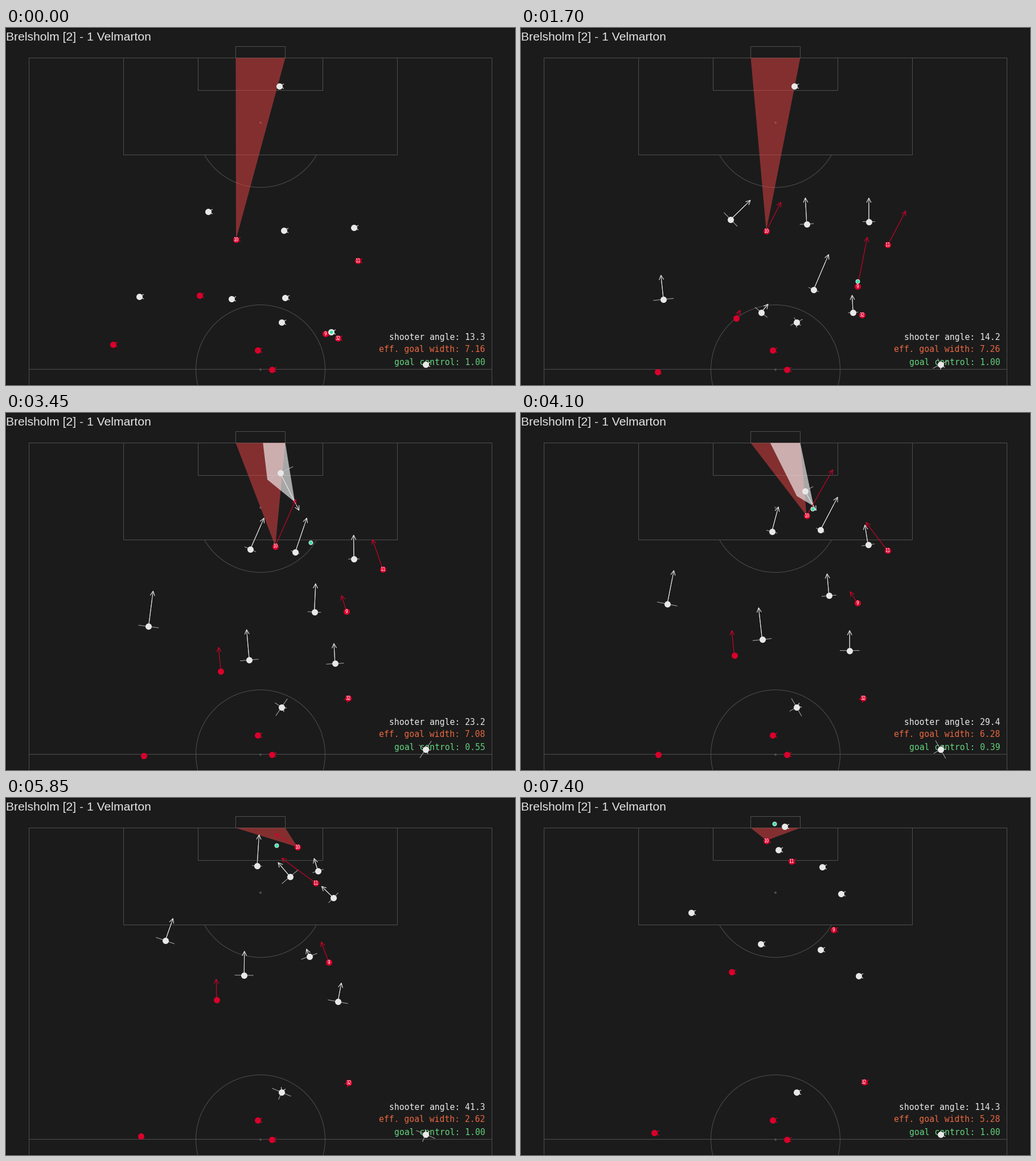
A matplotlib script for the animation above (7.45 s loop, 894 px wide and 626 px high).

```python
import numpy as np
import matplotlib.pyplot as plt
from matplotlib.animation import FuncAnimation
from matplotlib.collections import LineCollection
from matplotlib.patches import Arc, Circle, Polygon, Rectangle

W, H, DPI = 894, 626, 100
PX = 72 / DPI                    # points per pixel
STEP, FRAMES, END = 50, 149, 7.25
BUSY = (0, 1, 2.4, 3.45, 4.75, 5.85, END)   # key times near the ball
CALM = (0, 1, 2.4, 4.75, END)               # key times elsewhere
KICK, DASH = 2.4, 3.4                       # the pass, the keeper coming out
MID, GOAL_L, GOAL_R, GOAL_Y = 447, 403.5, 490.5, 52.5
METRE = np.array([11.9, 10.33])             # pixels per metre, across and along

BG, LINE = "#1b1b1b", "#4f4f4f"
WHITE, RED, BALL = "#e8e8e8", "#d9002b", "#3fe0a8"


def spline(points, times=BUSY, launch=None):
    """Smooth run through the points; at rest before a launch speed is set."""
    t, p = np.array(times, float), np.array(points, float)
    h = np.diff(t)
    slope = np.diff(p, axis=0) / h[:, None]
    n = len(t)
    m, rhs = np.zeros((n, n)), np.zeros((n, 2))
    m[0, :2], rhs[0] = (2, 1), 3 * slope[0]
    m[-1, -2:], rhs[-1] = (1, 2), 3 * slope[-1]
    for i in range(1, n - 1):
        a, b = 1 / h[i - 1], 1 / h[i]
        m[i, i - 1:i + 2] = a, 2 * (a + b), b
        rhs[i] = 3 * (a * slope[i - 1] + b * slope[i])
    if launch is not None:
        m[0, :2], rhs[0] = (1, 0), launch
    speed = np.linalg.solve(m, rhs)

    def at(now):
        if now < t[0]:
            return p[0], np.zeros(2)
        k = min(int(np.searchsorted(t, now, side="right")) - 1, n - 2)
        u, d = (now - t[k]) / h[k], p[k + 1] - p[k]
        m0, m1 = speed[k] * h[k], speed[k + 1] * h[k]
        b, c = 3 * d - 2 * m0 - m1, m0 + m1 - 2 * d
        return (p[k] + m0 * u + b * u**2 + c * u**3,
                (m0 + 2 * b * u + 3 * c * u**2) / h[k])
    return at


def burst(start, gain, rate, drift):
    """A sprint that dies away into a slow drift."""
    start, gain, drift = map(np.array, (start, gain, drift))

    def at(now):
        fade = np.exp(-rate * now)
        return start + gain * (1 - fade) + drift * now, gain * rate * fade + drift
    return at


def standing(spot, swing=0):
    """Stays put; only the heading sways."""
    def at(now):
        a = np.pi + np.radians(swing) * np.sin(2 * np.pi * (now - 1) / 5.6)
        return np.array(spot, float), 0.01 * np.array([np.cos(a), np.sin(a)])
    return at


numbers = ("10", "11", "9", "32")
reds = [
    spline([(404, 371), (415, 379), (448, 313), (473, 233.5), (525, 132.5), (512, 86),
            (431, 74.5)]),
    spline([(618, 408), (625, 411), (663, 335), (662, 274), (613, 208), (544, 149),
            (475, 111)]),
    spline([(561, 536), (578, 506), (600, 396), (598, 348), (582, 320), (567, 288),
            (549, 231)]),
    burst((583, 544), (16, -42), 1.8, (.5, -.5)),
    burst((188, 555), (61, 60), 1.4, (-2, -3.8)),
    spline([(340, 469), (369, 508), (380, 492), (372, 397), (370, 305)], CALM),
    standing((442, 565)),
    standing((467, 599)),
]
whites = [   # the keeper comes first
    spline([(480, 102), (507, 150), (499, 138), (452, 91)], (DASH, 4.75, 5.85, END),
           launch=(34, 68)),
    spline([(355, 322), (351, 347), (395, 303), (429, 239), (444, 179), (441, 119),
            (463, 50)]),
    spline([(488, 355), (501, 365), (500, 306), (508, 244), (543, 170), (548, 128),
            (529, 121)]),
    spline([(611, 350), (611, 359), (611, 306), (611, 256), (602, 209), (575, 175),
            (562, 168)]),
    spline([(234, 471), (250, 493), (247, 439), (265, 299), (299, 201)], CALM),
    spline([(396, 475), (412, 500), (428, 481), (420, 362), (421, 256)], CALM),
    spline([(490, 473), (498, 488), (531, 411), (538, 299), (526, 266)], CALM),
    spline([(571, 533), (582, 517), (581, 476), (578, 394), (593, 312)], CALM),
    standing((484, 516), swing=90),
    standing((737, 590), swing=90),
]
carried = spline([(571, 533), (583, 486), (600, 396)], (0, 1, KICK))
passed = spline([(600, 396), (535, 227), (496, 131), (475, 83), (445, 45)],
                (KICK,) + BUSY[3:], launch=(-80, -205))


def ball_at(now):
    return (carried if now < KICK else passed)(now)[0]


plt.rcParams["path.snap"] = False
fig = plt.figure(figsize=(W / DPI, H / DPI), dpi=DPI, facecolor=BG)
ax = fig.add_axes([0, 0, 1, 1])
ax.set(xlim=(0, W), ylim=(H, 0))
ax.axis("off")


def box(half_width, top, bottom, color=LINE):
    ax.add_patch(Rectangle((MID - half_width, top), 2 * half_width, bottom - top,
                           fill=False, ec=color, lw=PX))


def arc(y, r, a=0, b=360):
    ax.add_patch(Arc((MID, y), 2 * r, 2 * r, theta1=a, theta2=b, ec=LINE, lw=PX))


def label(x, y, size, color, font, text="", **kw):
    return ax.text(x, y, text, color=color, family=font, size=size * PX, **kw)


box(MID - .5, .5, H - .5, "#0e0e0e")
box(406.5, GOAL_Y, 700)
box(240.5, GOAL_Y, 222.5)
box(109.5, GOAL_Y, 109.5)
box(43.5, 32.5, GOAL_Y)
ax.plot([40.5, 853.5], [598.5, 598.5], color=LINE, lw=PX)
arc(599, 113.5)
tilt = np.degrees(np.arcsin(56.5 / 113.5))
arc(166, 113.5, tilt, 180 - tilt)
for y in (166, 599):
    ax.add_patch(Circle((MID, y), 2, color=LINE, lw=0))

label(0, 21.5, 21.1, "#e4e4e4", "Liberation Sans", "Brelsholm [2] - 1 Velmarton")
stats = [label(841.5, y, 14.72, c, "DejaVu Sans Mono", ha="right", zorder=3)
         for y, c in ((547.5, WHITE), (568, "#e8663f"), (590.5, "#62d27c"))]

cone = ax.add_patch(Polygon([(0, 0)] * 3, fc="#eb4446", alpha=.5, lw=0, zorder=2))
shadow = ax.add_patch(Polygon([(0, 0)] * 3, fc="#f4f4f4", alpha=.65, lw=0, zorder=2.5))


def strokes(color, width):
    lines = LineCollection([], colors=color, linewidths=width * PX, zorder=4)
    ax.add_collection(lines)
    return lines


def dots(color, size, z, **kw):
    return ax.scatter([], [], s=(size * PX) ** 2, c=color, zorder=z, **kw)


reach_lines = strokes("#bdbdbd", .9)
white_arrows, red_arrows = strokes(WHITE, 1.1), strokes(RED, 1.1)
red_dots = dots(RED, 11, 5, linewidths=0)
white_dots = dots(WHITE, 11, 7, linewidths=0)
ball_dot = dots(BALL, 7, 8, edgecolors="#f0fff8", linewidths=.9 * PX)
shirts = [label(0, 0, 7.7, "white", "DejaVu Sans Mono", n, ha="center", zorder=6)
          for n in numbers]


def unit(v):
    return v / max(np.hypot(*v), 1e-9)


def normal(d):
    return np.array([-d[1], d[0]])


def arrow(pos, vel):
    """Shaft and two barbs of an open arrow; a still one keeps its barbs."""
    d, tip = unit(vel), pos + vel
    n = normal(d)
    return [[pos, tip], [tip - 8 * d + 4 * n, tip, tip - 8 * d - 4 * n]]


def reach(pos, vel, ball_pos, scale=1):
    """Left, right and front points a defender can cover."""
    d = unit(vel)
    r = scale * min(18, 6.5 + .042 * np.hypot(*(ball_pos - pos)))
    side = r * normal(d)
    return pos + side, pos - side, pos + .78 * max(r, np.hypot(*vel)) * d


def blocked(shot, points):
    """Part of the goal hidden by the points: outline and its width."""
    points = [p for p in points if p[1] < shot[1] - 3]
    if len(points) < 2:
        return None, 0
    cast = [shot[0] + (p[0] - shot[0]) * (shot[1] - GOAL_Y) / (shot[1] - p[1])
            for p in points]
    i, j = int(np.argmin(cast)), int(np.argmax(cast))
    left, right = np.clip([cast[i], cast[j]], GOAL_L, GOAL_R)
    if right - left < 1:
        return None, 0
    return [points[i], (left, GOAL_Y), (right, GOAL_Y), points[j]], right - left


def shot_view(shot):
    """Opening angle in degrees and goal width as seen from the near post."""
    a = (np.array([GOAL_L, GOAL_Y]) - shot) / METRE
    b = (np.array([GOAL_R, GOAL_Y]) - shot) / METRE
    da, db = np.hypot(*a), np.hypot(*b)
    angle = np.arccos(np.dot(a, b) / (da * db))
    return np.degrees(angle), 2 * min(da, db) * np.sin(angle / 2)


def draw(frame):
    t = min(frame * STEP / 1000, END)
    paused = frame == 0 or t >= END

    def state(player):
        pos, vel = player(t)
        return pos, np.array([-.01, 0]) if paused or not vel.any() else vel

    red, white = [state(p) for p in reds], [state(p) for p in whites]
    ball_pos = ball_at(t)
    shot = red[0][0]

    red_dots.set_offsets([p for p, _ in red])
    white_dots.set_offsets([p for p, _ in white])
    ball_dot.set_offsets([ball_pos])
    red_arrows.set_segments([s for p, v in red for s in arrow(p, v)])
    white_arrows.set_segments([s for p, v in white for s in arrow(p, v)])
    for text, (pos, _) in zip(shirts, red):
        text.set_position(pos + (0, 3))

    lines, outline, hidden = [], None, 0
    if not paused:
        for k, (pos, vel) in enumerate(white):
            is_keeper = k == 0
            if is_keeper and t < DASH:
                continue
            left, right, front = reach(pos, vel, ball_pos, 2.1 if is_keeper else 1)
            lines += [[left, right], [pos, front]]
            if is_keeper and pos[1] < shot[1]:
                outline, hidden = blocked(shot, (left, right, front))
    reach_lines.set_segments(lines)

    cone.set_xy([shot, (GOAL_L, GOAL_Y), (GOAL_R, GOAL_Y)])
    shadow.set_visible(outline is not None)
    if outline is not None:
        shadow.set_xy(outline)

    angle, width = shot_view(shot)
    control = 1 - hidden / (GOAL_R - GOAL_L)
    stats[0].set_text(f"shooter angle: {angle:.1f}")
    stats[1].set_text(f"eff. goal width: {width:.2f}")
    stats[2].set_text(f"goal control: {control:.2f}")
    return []


anim = FuncAnimation(fig, draw, frames=FRAMES, interval=STEP, init_func=lambda: [],
                     repeat=True, repeat_delay=0, blit=False)
plt.show()
```
